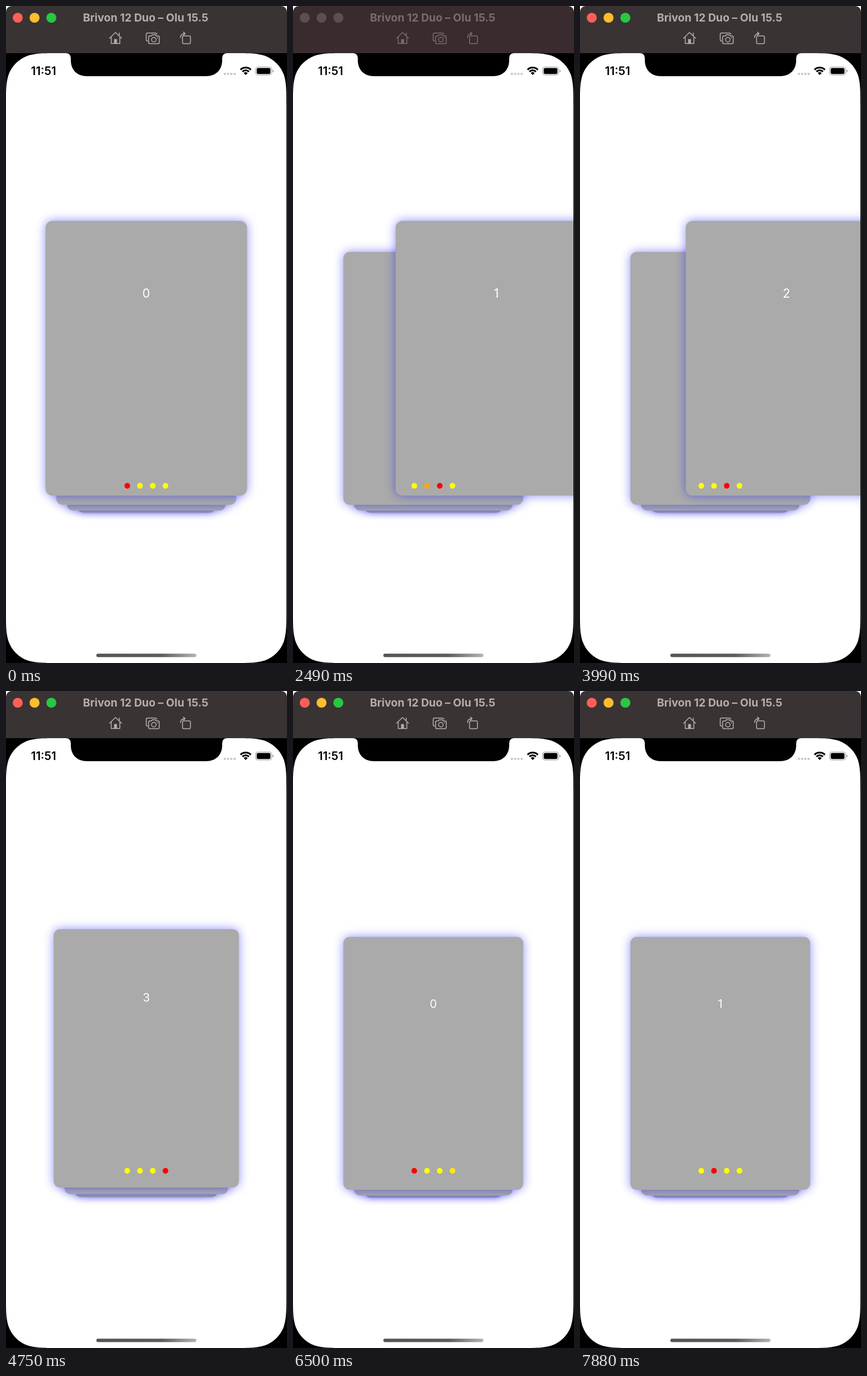
Write an HTML page with a canvas that moves like this. It is 490 px wide and 1142 px high and loops after 8000 ms.

```html
<!DOCTYPE html>
<html lang="en">
<head>
<meta charset="utf-8">
<title>Card stack</title>
<style>
html, body { margin: 0; width: 100%; height: 100%; overflow: hidden; background: #fff; }
canvas { display: block; width: 490px; height: 1142px; }
</style>
</head>
<body>
<canvas id="stage" width="490" height="1142"></canvas>
<script>
const ctx = document.getElementById('stage').getContext('2d');
const W = 490, H = 1142, LOOP = 8000, TICK = 125;
const FONT = 'Inter, "Liberation Sans", sans-serif';

// Each swipe: drag offset per tick; the last `fly` ticks come after release.
const SWIPES = [
  { card: 0, at: 4, fly: 1, path: [110] },
  { card: 1, at: 20, fly: 1, path: [110] },
  { card: 2, at: 29, fly: 1, path: [12, 100, 100, 115.5, 70, 0, -110, -330] },
  { card: 3, at: 44, fly: 1, path: [12, 36, 66, 92, 110, 120, 126, 240] },
  { card: 0, at: 58, fly: 2, path: [15, 50, 90, 130, 330] }
];
const RISE = [1, 0.75, 0.2, 0];
const FADE = [0.65, 0.92, 1];

// Card edges at each depth of the stack.
const DEPTH = [0, 1, 2, 3, 4].map(i => ({
  w: 351.4 - 37.7 * i,
  h: 477.6 - 38 * i,
  bottom: 851 + 19 * i - 3 * i * i
}));

const lerp = (a, b, k) => a + (b - a) * k;

function box(x, y, w, h, r) {
  ctx.beginPath();
  ctx.roundRect(x, y, w, h, r);
}

function disc(x, y, r, color) {
  ctx.fillStyle = color;
  ctx.beginPath();
  ctx.arc(x, y, r, 0, Math.PI * 2);
  ctx.fill();
}

function label(str, x, y, size, weight, color) {
  ctx.font = `${weight} ${size}px ${FONT}`;
  ctx.fillStyle = color;
  ctx.textAlign = 'center';
  ctx.fillText(str, x, y + size * 0.364);
}

function poseAt(tick) {
  let pose = { card: 0, offset: 0, rise: 0, active: 0, last: -1, fade: 1 };
  for (const s of SWIPES) {
    const n = tick - s.at, len = s.path.length, next = (s.card + 1) % 4;
    if (n < 0) break;
    const since = n - (len - s.fly);
    const gone = n >= len;
    pose = {
      card: gone ? next : s.card,
      offset: gone ? 0 : s.path[n],
      rise: gone ? RISE[Math.min(n - len, 3)] : 0,
      active: since >= 0 ? next : s.card,
      last: since >= 0 ? s.card : -1,
      fade: FADE[Math.min(Math.max(since, 0), 2)]
    };
  }
  return pose;
}

function smoothCorner(sx, sy, x, y, r, fromTop) {
  const a = 1.5287, b = 1.0885, c = 0.8684, d = 0.6315, e = 0.0749, f = 0.3728, g = 0.1691;
  const pts = [[a, 0], [b, 0], [c, 0], [d, e], [f, g], [g, f], [e, d], [0, c], [0, b], [0, a]];
  if (!fromTop) pts.reverse();
  const p = pts.map(([u, v]) => [x + sx * u * r, y + sy * v * r]);
  ctx.lineTo(...p[0]);
  for (let i = 1; i < 10; i += 3) ctx.bezierCurveTo(...p[i], ...p[i + 1], ...p[i + 2]);
}

function screenPath() {
  ctx.beginPath();
  smoothCorner(1, 1, 0, 82, 59.5, false);
  ctx.lineTo(104, 82);
  ctx.quadraticCurveTo(113, 82, 113, 91);
  ctx.lineTo(113, 94);
  ctx.bezierCurveTo(113, 111, 124, 122, 141, 122);
  ctx.lineTo(349, 122);
  ctx.bezierCurveTo(366, 122, 377, 111, 377, 94);
  ctx.lineTo(377, 91);
  ctx.quadraticCurveTo(377, 82, 386, 82);
  smoothCorner(-1, 1, 489, 82, 59.5, true);
  smoothCorner(-1, -1, 489, 1142, 59.5, false);
  smoothCorner(1, -1, 0, 1142, 59.5, true);
  ctx.closePath();
}

function drawCard(id, level, offset) {
  const i = Math.min(Math.floor(level), 3), k = level - i;
  const a = DEPTH[i], b = DEPTH[i + 1];
  const w = lerp(a.w, b.w, k), h = lerp(a.h, b.h, k);
  const bottom = lerp(a.bottom, b.bottom, k);
  const cx = 244.6 + offset, scale = h / DEPTH[0].h;
  ctx.save();
  ctx.globalAlpha = Math.min(1, 4 - level);
  ctx.shadowColor = 'rgba(0, 0, 255, 0.45)';
  ctx.shadowBlur = 18 * scale;
  ctx.fillStyle = '#aaa';
  box(cx - w / 2, bottom - h, w, h, 12 * scale);
  ctx.fill();
  ctx.shadowColor = 'transparent';
  label(id, cx, bottom - h * 0.736, 21.4 * scale, 400, '#fff');
  ctx.restore();
}

function drawStack(pose) {
  for (let k = 3; k >= 0; k--) {
    const level = k + pose.rise;
    if (level < 4) drawCard((pose.card + k) % 4, level, k ? 0 : pose.offset);
  }
  for (let i = 0; i < 4; i++) {
    let green = 255;
    if (i === pose.last) green = Math.round(255 * pose.fade);
    if (i === pose.active) green = 0;
    disc(211.5 + 22.2 * i, 834, 4.9, `rgb(255, ${green}, 0)`);
  }
}

function drawIcons(color) {
  ctx.strokeStyle = ctx.fillStyle = color;
  ctx.lineWidth = 1.5;
  ctx.lineCap = ctx.lineJoin = 'round';

  // home
  ctx.beginPath();
  ctx.moveTo(180.5, 56);
  ctx.lineTo(191, 46);
  ctx.lineTo(201.5, 56);
  ctx.moveTo(183.5, 54);
  ctx.lineTo(183.5, 65.3);
  ctx.lineTo(198.5, 65.3);
  ctx.lineTo(198.5, 54);
  ctx.moveTo(197.5, 51);
  ctx.lineTo(197.5, 47);
  ctx.stroke();
  ctx.fillRect(188.5, 57.5, 5, 8);

  // camera
  ctx.beginPath();
  ctx.moveTo(247, 61);
  ctx.quadraticCurveTo(244.5, 61, 244.5, 58.5);
  ctx.lineTo(244.5, 49.5);
  ctx.quadraticCurveTo(244.5, 47, 247, 47);
  ctx.lineTo(260, 47);
  ctx.quadraticCurveTo(262.8, 47, 263, 49);
  ctx.stroke();
  ctx.beginPath();
  ctx.moveTo(251, 52);
  ctx.lineTo(253.5, 52);
  ctx.lineTo(255, 50);
  ctx.lineTo(260.5, 50);
  ctx.lineTo(262, 52);
  ctx.lineTo(265, 52);
  ctx.quadraticCurveTo(267.3, 52, 267.3, 54.5);
  ctx.lineTo(267.3, 63);
  ctx.quadraticCurveTo(267.3, 65.5, 265, 65.5);
  ctx.lineTo(251, 65.5);
  ctx.quadraticCurveTo(248.6, 65.5, 248.6, 63);
  ctx.lineTo(248.6, 54.5);
  ctx.quadraticCurveTo(248.6, 52, 251, 52);
  ctx.stroke();
  ctx.beginPath();
  ctx.arc(257.8, 58.5, 4, 0, Math.PI * 2);
  ctx.stroke();
  disc(264.2, 55, 0.9, color);

  // rotate
  box(307.8, 52, 13.8, 13.4, 2);
  ctx.stroke();
  ctx.beginPath();
  ctx.moveTo(304.4, 55);
  ctx.quadraticCurveTo(304.4, 48, 312, 48);
  ctx.moveTo(309.4, 45.4);
  ctx.lineTo(312.4, 48);
  ctx.lineTo(309.4, 50.8);
  ctx.stroke();
}

function drawTitleBar(focused) {
  const ink = focused ? '#b4aeb0' : '#7b6b6f';
  const lights = focused ? ['#ff5f57', '#febc2e', '#28c840'] : Array(3).fill('#5d4e51');
  ctx.fillStyle = focused ? '#393334' : '#3a2b2e';
  box(0, 0, W, 82, [10, 10, 0, 0]);
  ctx.fill();
  lights.forEach((color, i) => disc(20.5 + 29.3 * i, 20.4, 8.7, color));
  label('Brivon 12 Duo – Olu 15.5', 243.5, 20, 19, 700, ink);
  drawIcons(ink);
}

function drawStatus() {
  label('11:51', 65.5, 113.2, 20, 600, '#000');
  for (let i = 0; i < 4; i++) disc(381.6 + 5.7 * i, 118, 2.1, '#c8c8c8');

  ctx.strokeStyle = ctx.fillStyle = '#000';
  ctx.lineCap = 'butt';
  const from = -Math.PI * 0.75, to = -Math.PI * 0.25;
  for (const r of [12.7, 8]) {
    ctx.lineWidth = 3;
    ctx.beginPath();
    ctx.arc(418, 119.8, r, from, to);
    ctx.stroke();
  }
  ctx.beginPath();
  ctx.moveTo(418, 120);
  ctx.arc(418, 119.8, 4.8, from, to);
  ctx.fill();

  box(437.2, 107.8, 24, 10.4, 2.6);
  ctx.fill();
  ctx.strokeStyle = ctx.fillStyle = '#a0a0a0';
  ctx.lineWidth = 1.2;
  box(435.4, 106, 27.8, 14, 4.2);
  ctx.stroke();
  box(464.8, 110.8, 1.8, 4.6, [0, 1.8, 1.8, 0]);
  ctx.fill();
}

function drawHomeBar() {
  const shade = ctx.createLinearGradient(158, 0, 332, 0);
  shade.addColorStop(0, '#555');
  shade.addColorStop(0.65, '#5c5c5c');
  shade.addColorStop(1, '#b4b4b4');
  ctx.fillStyle = shade;
  box(157.5, 1125.8, 174.5, 6, 3);
  ctx.fill();
}

function draw(ms) {
  const tick = Math.floor((ms % LOOP + 15) / TICK) % (LOOP / TICK);
  ctx.fillStyle = '#fff';
  ctx.fillRect(0, 0, W, H);
  ctx.fillStyle = '#000';
  ctx.fillRect(0, 82, W, H - 82);
  drawTitleBar(tick < 10 || tick >= 29);

  ctx.save();
  screenPath();
  ctx.fillStyle = '#fff';
  ctx.fill();
  ctx.clip();
  drawStack(poseAt(tick));
  drawStatus();
  drawHomeBar();
  ctx.restore();
}

let start;
function loop(now) {
  start ??= now;
  draw(now - start);
  requestAnimationFrame(loop);
}
requestAnimationFrame(loop);
</script>
</body>
</html>
```
